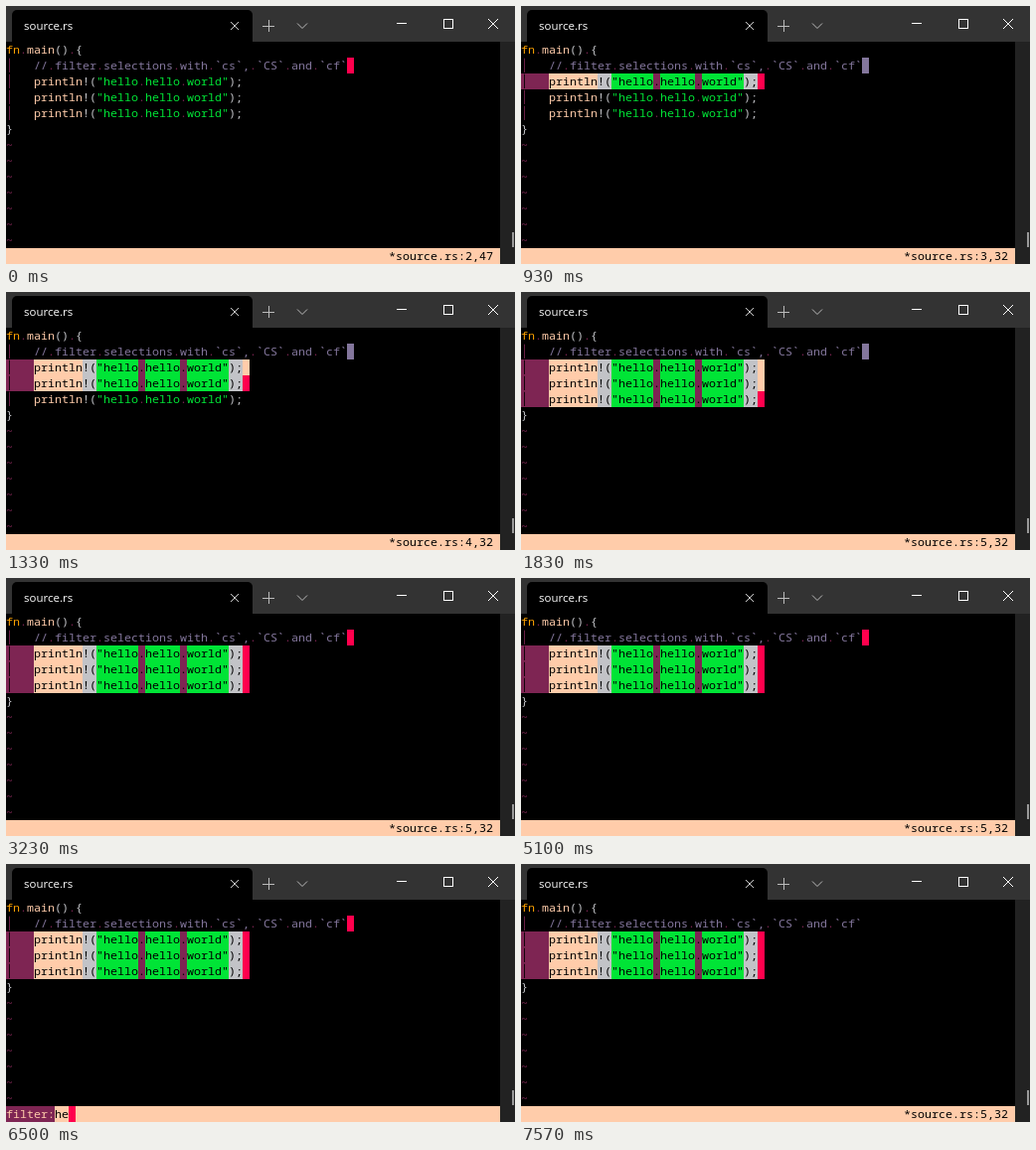
An HTML page with a canvas that plays this animation: 512x260 px, repeating every 8 s.

```html
<!DOCTYPE html>
<html lang="en">
<head>
<meta charset="utf-8">
<title>Terminal editor</title>
<style>
  html, body { margin: 0; width: 100%; height: 100%; overflow: hidden; background: #000; }
  canvas { display: block; width: 512px; height: 260px; }
</style>
</head>
<body>
<canvas id="stage" width="512" height="260"></canvas>
<script>
const g = document.getElementById('stage').getContext('2d');
const LOOP = 8000, CELL = 7, ROW = 16, TOP = 36, STATUS = 13;
const C = {
  red: '#ff004d', peach: '#ffccaa', plum: '#7e2553', gray: '#c2c3c7',
  green: '#00e436', orange: '#ffa300', lilac: '#83769c', black: '#000'
};

// Each line is a list of [text, colour]; '\n' is the selectable line end.
const call = [['│   ', C.plum], ['println', C.peach], ['!(', C.gray],
  ['"hello hello world"', C.green], [');', C.gray], ['\n', C.peach]];
const lines = [
  [['fn', C.orange], [' ', C.plum], ['main', C.peach], ['() {', C.gray]],
  [['│   ', C.plum], ['// filter selections with `cs`, `CS` and `cf`', C.lilac], ['\n', C.lilac]],
  call, call, call,
  [['}', C.gray]]
];
const END = [0, 49, 34, 34, 34];   // cell of the line end in each row

const rowY = row => TOP + row * ROW;

function fill(col, row, n, color) {
  g.fillStyle = color;
  g.fillRect(col * CELL, rowY(row), n * CELL, ROW);
}

function glyphs(text, col, row, color) {
  g.fillStyle = color;
  [...text].forEach((ch, i) => g.fillText(ch, (col + i) * CELL, rowY(row) + 12));
}

function drawLine(row, selected) {
  let col = 0;
  for (const [text, color] of lines[row]) {
    const tab = text[0] === '│';
    for (const ch of text) {
      const blank = ch === ' ';
      const tint = blank ? C.plum : color;
      const picked = selected || false;
      if (picked) fill(col, row, 1, tint);
      const shown = blank ? (tab ? '' : '.') : ch === '\n' ? '' : ch;
      glyphs(shown, col, row, picked ? C.black : tint);
      col++;
    }
  }
}

function stroke(points, color, width = 1) {
  g.strokeStyle = color;
  g.lineWidth = width;
  g.beginPath();
  points.forEach(([x, y], i) => i % 2 || points.length === 3 && i
    ? g.lineTo(x, y) : g.moveTo(x, y));
  g.stroke();
}

const cross = (x, y, r, color) =>
  stroke([[x - r, y - r], [x + r, y + r], [x + r, y - r], [x - r, y + r]], color);

function drawWindow() {
  g.fillStyle = '#333';
  g.fillRect(0, 0, 512, TOP);
  g.fillStyle = C.black;
  g.beginPath();
  g.roundRect(6, 4, 242, 32, [5, 5, 0, 0]);
  g.fill();
  g.fillRect(0, TOP, 497, 224);
  g.fillStyle = '#222';
  g.fillRect(497, TOP, 15, 224);
  g.fillStyle = '#999';
  g.fillRect(509, 228, 2, 15);

  g.font = '11.5px "Open Sans", "Noto Sans", sans-serif';
  g.fillStyle = '#fff';
  g.fillText('source.rs', 18, 24);
  cross(230, 20, 4, '#ccc');
  stroke([[258, 20.5], [270, 20.5], [264.5, 14], [264.5, 26]], '#bbb');
  stroke([[293, 17.5], [298, 22.5], [303, 17.5]], '#bbb');
  stroke([[393, 17.5], [403, 17.5]], '#fff');
  g.strokeStyle = '#fff';
  g.strokeRect(440.5, 13.5, 9, 9);
  cross(490, 18, 5, '#fff');
}

function drawStatus(t, row) {
  fill(0, STATUS, 71, C.peach);
  if (t >= 6000 && t < 7470) {
    const typed = 'hello'.slice(0, [6330, 6500, 6600, 6730, 6900].filter(k => t >= k).length);
    fill(0, STATUS, 7, C.plum);
    glyphs('filter:', 0, STATUS, C.peach);
    glyphs(typed, 7, STATUS, C.black);
    fill(7 + typed.length, STATUS, 1, C.red);
    return;
  }
  const pos = row === 1 ? '2,47' : `${row + 1},32`;
  glyphs('*source.rs:' + pos, 55, STATUS, C.black);
  if (t >= 3000 && t < 3170 || t >= 5470 && t < 6000) glyphs('c', 53, STATUS, C.black);
}

function draw(t) {
  drawWindow();
  g.font = '11.67px "Noto Sans Mono", "DejaVu Sans Mono", monospace';

  const row = 1 + [870, 1100, 1730].filter(k => t >= k).length;
  const split = t >= 3170, filtered = t >= 7470;
  lines.forEach((_, i) => drawLine(i, i >= 2 && i <= row));
  for (let i = 6; i < STATUS; i++) glyphs('~', 0, i, C.plum);

  if (row > 1 && !split) fill(END[1], 1, 1, C.lilac);
  for (let i = 1; i <= row; i++) {
    const cursor = i === row || split && !(filtered && i === 1);
    if (cursor) fill(END[i], i, 1, C.red);
  }
  drawStatus(t, row);
}

const start = performance.now();
function tick() {
  draw((performance.now() - start) % LOOP);
  requestAnimationFrame(tick);
}
tick();
</script>
</body>
</html>
```
